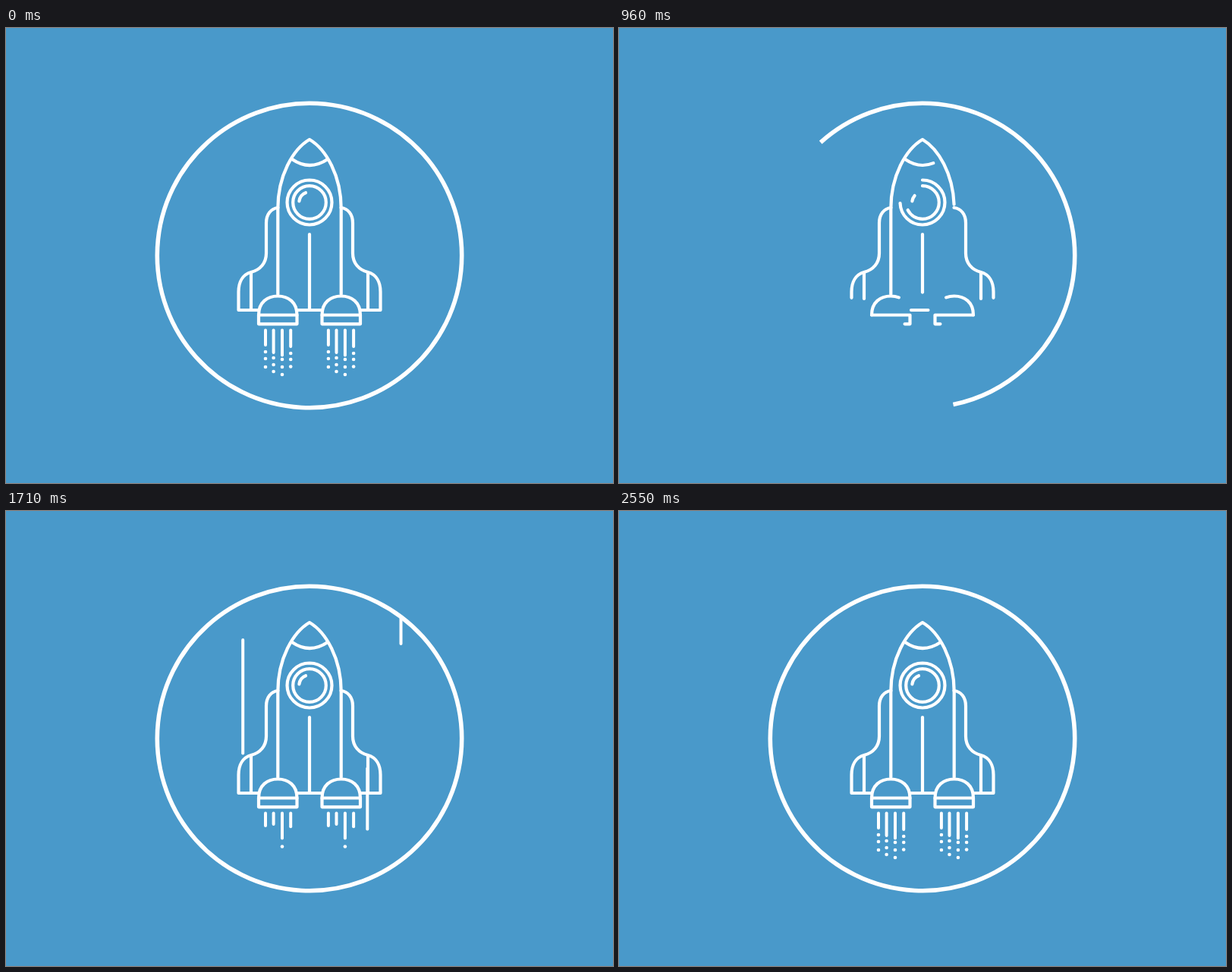
An HTML page with a canvas for the animation above (2.85 s loop, 800x600 px).

```html
<!DOCTYPE html>
<html lang="en">
<head>
<meta charset="utf-8">
<title>Rocket</title>
<style>
  html, body { margin: 0; width: 100%; height: 100%; overflow: hidden; background: #4999ca; }
  canvas { display: block; }
</style>
</head>
<body>
<canvas id="stage" width="800" height="600"></canvas>
<script>
const ctx = document.getElementById('stage').getContext('2d');
const LOOP = 2850, STEP = 30;
const ERASE_START = 300, ERASE_END = 600;

const clamp = v => Math.max(0, Math.min(1, v));
const easeOut = v => Math.sin(clamp(v) * Math.PI / 2);
const easeBack = t => Math.cos(clamp((t - ERASE_START) / (ERASE_END - ERASE_START)) * Math.PI / 2);

// A stroke that can be drawn partially from its start point.
function stroke(d, start, duration, width = 4.2, cap = 'round') {
  const el = document.createElementNS('http://www.w3.org/2000/svg', 'path');
  el.setAttribute('d', d);
  return { path: new Path2D(d), length: el.getTotalLength(), start, duration, width, cap };
}

function circle(x, y, r, degrees = 0) {
  const a = degrees * Math.PI / 180, dx = r * Math.cos(a), dy = r * Math.sin(a);
  return `M${x + dx} ${y + dy}A${r} ${r} 0 0 1 ${x - dx} ${y - dy}A${r} ${r} 0 0 1 ${x + dx} ${y + dy}`;
}

// Mirrors a path made of absolute "x,y" pairs around the rocket's axis.
const mirror = d => d.replace(/([\d.]+),/g, (_, x) => `${800 - x},`);

const wing = 'M358.5,237C349,238 343,246 343,257L343,297C343,310 335,319 323,322' +
  'C312,325 306.5,335 306.5,348L306.5,372L332,372';
const fin = 'M323,323L323,371';
const dome = 'M333,378.5C333,361.5 344.5,353.5 358.2,353.5C372,353.5 383.5,361.5 383.5,378.5';
const nozzle = 'M333,378.5L383.5,378.5L383.5,390.3L333,390.3Z';

const strokes = [
  stroke(circle(400, 300, 200.7, 228), 690, 680, 5.6, 'butt'),
  stroke('M358.3 351V238C358.3 195 378 160 400 147C422 160 441.7 195 441.7 238V351', 680, 540),
  stroke('M377 173Q400 189 424 173', 720, 420),
  stroke(circle(400, 230, 29.5, -90), 720, 450),
  stroke(circle(400, 230, 21.8, -90), 750, 450),
  stroke('M386.4 228.3A13.7 13.7 0 0 1 395 217.2', 840, 330),
  stroke('M400 272V371', 690, 480),
  stroke('M385 372H415', 750, 390),
  ...[wing, fin, dome, nozzle].flatMap((d, i) =>
    [d, mirror(d)].map(p => stroke(p, 690 + i * 30, 480)))
];

function drawStroke(s, t) {
  const p = t < 645 ? easeBack(t) : easeOut((t - s.start) / s.duration);
  if (p < 0.002) return;
  ctx.lineWidth = s.width;
  ctx.lineCap = s.cap;
  ctx.setLineDash(p < 0.9995 ? [p * s.length, s.length + 20] : []);
  ctx.stroke(s.path);
}

function vertical(x, top, bottom, width = 4) {
  const r = width / 2;
  ctx.lineWidth = width;
  ctx.lineCap = 'round';
  ctx.beginPath();
  ctx.moveTo(x, top + r);
  ctx.lineTo(x, Math.max(top + r + 0.01, bottom - r));
  ctx.stroke();
}

const FLAME_TOP = 396.5, DROP_SPEED = 0.3;
const flames = [
  { x: 342, bottom: 420, start: 1475, dots: [427, 436, 447] },
  { x: 352.6, bottom: 430, start: 1560, dots: [435, 444, 453] },
  { x: 364, bottom: 433.5, start: 1410, dots: [437, 447, 457] },
  { x: 375.2, bottom: 422, start: 1480, dots: [429, 437, 446.5] }
];

function drawFlame(f, offset, t) {
  const x = f.x + offset;
  const erasing = t < 645;
  const limit = erasing ? FLAME_TOP + 64 * easeBack(t) : 600;
  const grown = erasing ? 1 : clamp((t - f.start) / 270);
  const bottom = Math.min(limit, FLAME_TOP + (f.bottom - FLAME_TOP) * grown);
  if (bottom - FLAME_TOP > 0.8) vertical(x, FLAME_TOP, bottom);
  f.dots.forEach((end, i) => {
    const age = t - f.start - 270 - (2 - i) * 40;
    if (!erasing && age <= 0) return;
    const y = erasing ? end : Math.min(end, f.bottom + age * DROP_SPEED);
    if (y > limit) return;
    ctx.beginPath();
    ctx.arc(x, y, 2.3, 0, 2 * Math.PI);
    ctx.fill();
  });
}

// Each streak falls through the ring twice; "top" is its upper end at time "at".
const streaks = [
  { x: 476.3, length: 84, top: 337.5, at: 1710, speed: 1.556 },
  { x: 312.2, length: 153.5, top: 168, at: 1710, speed: 1.605 },
  { x: 520.5, length: 131, top: 46, at: 1710, speed: 1.57 },
  { x: 273.5, length: 120, top: 190.5, at: 1950, speed: 1.58 }
];

function drawStreaks(t) {
  if (t < 1400) return;
  ctx.save();
  ctx.beginPath();
  ctx.arc(400, 300, 200, 0, 2 * Math.PI);
  ctx.clip();
  for (const s of streaks) {
    for (const delay of [0, 420]) {
      const top = s.top + s.speed * (t - s.at - delay);
      vertical(s.x, top, top + s.length);
    }
  }
  ctx.restore();
}

function draw(t) {
  ctx.fillStyle = '#4999ca';
  ctx.fillRect(0, 0, 800, 600);
  ctx.strokeStyle = ctx.fillStyle = '#fff';
  ctx.lineJoin = 'round';
  strokes.forEach(s => drawStroke(s, t));
  ctx.setLineDash([]);
  drawStreaks(t);
  for (const f of flames) {
    drawFlame(f, 0, t);
    drawFlame(f, 82.9, t);
  }
}

const origin = performance.now();
function frame() {
  const t = (performance.now() - origin) % LOOP;
  draw(Math.floor(t / STEP) * STEP);
  requestAnimationFrame(frame);
}
frame();
</script>
</body>
</html>
```
